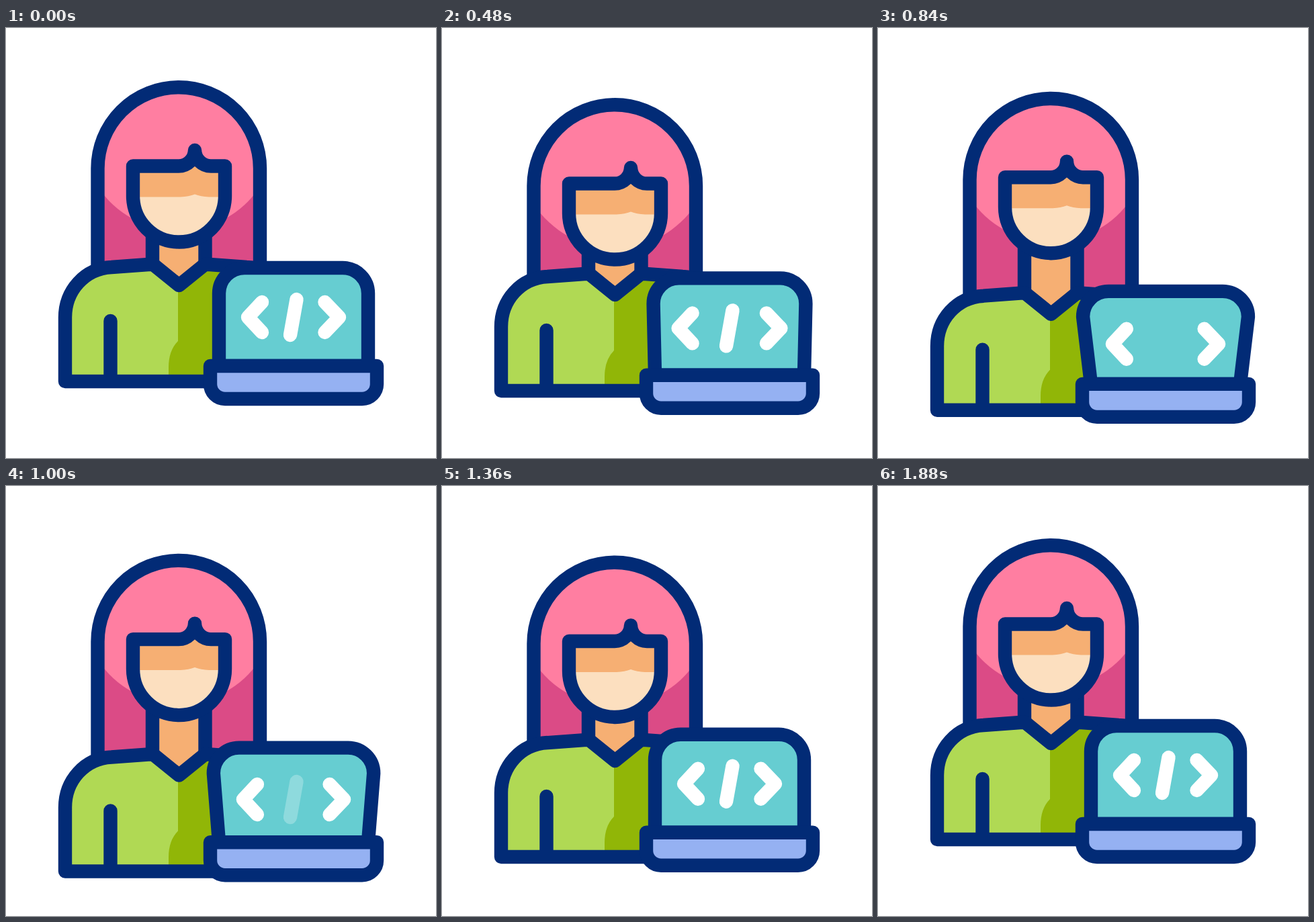
An HTML page that plays this animation: 640x640 px, repeating every 2000 ms.

```html
<!DOCTYPE html>
<html lang="en">
<head>
<meta charset="utf-8">
<title>Programmer at a laptop</title>
<style>
  html, body { margin: 0; width: 100%; height: 100%; overflow: hidden; background: #fff; }
  svg { display: block; width: 100%; height: 100%; }
  .line { stroke: #022b76; stroke-width: 20.4; stroke-linecap: round; stroke-linejoin: round; }
  .code { fill: none; stroke: #fff; stroke-width: 20.4; stroke-linecap: round; stroke-linejoin: round; }
</style>
</head>
<body>
<svg viewBox="0 0 640 640" fill="none">
  <g id="head">
    <path fill="#db4b86" d="M136.500 420V209A120.750 120.750 0 0 1 378 209V420Z"/>
    <path fill="#ff7ea1" d="M136.500 236A144 144 0 0 0 378 236V209A120.750 120.750 0 0 0 136.500 209Z"/>
    <path class="line" d="M136.500 420V209A120.750 120.750 0 0 1 378 209V420"/>
    <path class="line" fill="#f6af73" d="M218 300V420H296.500V300"/>
    <path fill="#fcdfbf" d="M189 205V250A68.500 68.500 0 0 0 326 250V205Z"/>
    <path fill="#f6af73" d="M189 200H326V251.500H302Q290 251 281 247.500Q272 251 260 251.500H189Z"/>
    <path fill="#ff7ea1" d="M250 206A24 24 0 0 0 281 182A24 24 0 0 0 312 206V195H250Z"/>
    <path class="line" d="M281 182A24 24 0 0 1 257 205.500H189V250A68.500 68.500 0 0 0 326 250V205.500H305A24 24 0 0 1 281 182"/>
  </g>
  <g id="body">
    <path fill="#b0d954" d="M88 526V431C88 391 117 358 157 356L218.500 351.500L257.500 383L296.500 351.500L358 356C398 358 427 391 427 431V526Z"/>
    <path fill="#91b607" d="M256 383L296.500 351.500L358 356C398 358 427 391 427 431V526H242V505Q242 480 256 466Z"/>
    <path class="line" d="M88 526V431C88 391 117 358 157 356L218.500 351.500L257.500 383L296.500 351.500L358 356C398 358 427 391 427 431V526ZM155.500 436V526"/>
  </g>
  <g id="laptop">
    <path id="screen" class="line" fill="#66cdd1"/>
    <g id="signs">
      <path id="open" class="code" d="M381 408L360 430.500L381 453"/>
      <path id="slash" class="code" d="M432.500 404L423 457"/>
      <path id="close" class="code" d="M474.500 408L496 430.500L474.500 453"/>
    </g>
    <path class="line" fill="#95b1f2" d="M304 503H552V530A22 22 0 0 1 530 552H326A22 22 0 0 1 304 530Z"/>
  </g>
</svg>
<script>
const LOOP = 2000, STEP = 40;
const el = id => document.getElementById(id);
const [head, body, laptop, screen, signs, open, slash, close] =
  ["head", "body", "laptop", "screen", "signs", "open", "slash", "close"].map(el);

// Keys are [time, value, skew]; a positive skew makes the move settle more slowly.
const tracks = {
  head: [[146, 0], [620, 33], [870, 16], [1180, 33.3], [1750, 0]],
  body: [[188, 0], [1000, 47.5], [1770, 0]],
  laptop: [[120, 0], [960, 27.2, 0.72], [1000, 27.2], [1690, 0]],
  tilt: [[343, 0], [820, 12], [1297, 0]],
  spread: [[80, 0], [720, 12.3], [1345, 0]],
  slash: [[520, 1], [700, 0], [940, 0], [1120, 1]]
};

function valueAt(keys, t) {
  if (t <= keys[0][0]) return keys[0][1];
  for (let i = 1; i < keys.length; i++) {
    const [t0, v0] = keys[i - 1], [t1, v1, skew = 0] = keys[i];
    if (t < t1) {
      let u = (t - t0) / (t1 - t0);
      u += skew * u * u * (1 - u);
      return v0 + (v1 - v0) * u * u * (3 - 2 * u);
    }
  }
  return keys[keys.length - 1][1];
}

const shift = (node, x, y) => node.setAttribute("transform", `translate(${x} ${y})`);

// The lid leans towards the viewer: its upper edge widens and sinks.
function lid(k) {
  const drop = 0.67 * k, side = 395 + drop, top = 357 + drop;
  const l = x => x - k, r = x => 856 - x + k;
  return `M317 503L${l(317)} ${side}C${l(317)} ${side - 21} ${l(334)} ${top} ${l(355)} ${top}` +
    `H${r(355)}C${r(334)} ${top} ${r(317)} ${side - 21} ${r(317)} ${side}L539 503Z`;
}

function draw(t) {
  const at = name => valueAt(tracks[name], t);
  const tilt = at("tilt"), spread = at("spread");
  shift(head, 0, at("head"));
  shift(body, 0, at("body"));
  shift(laptop, 0, at("laptop"));
  screen.setAttribute("d", lid(tilt));
  shift(signs, 0, 1.08 * tilt);
  shift(open, -spread, 0);
  shift(close, spread, 0);
  slash.setAttribute("opacity", at("slash"));
}

function tick() {
  const t = performance.now() % LOOP;
  draw(Math.floor(t / STEP) * STEP);
  requestAnimationFrame(tick);
}
tick();
</script>
</body>
</html>
```
